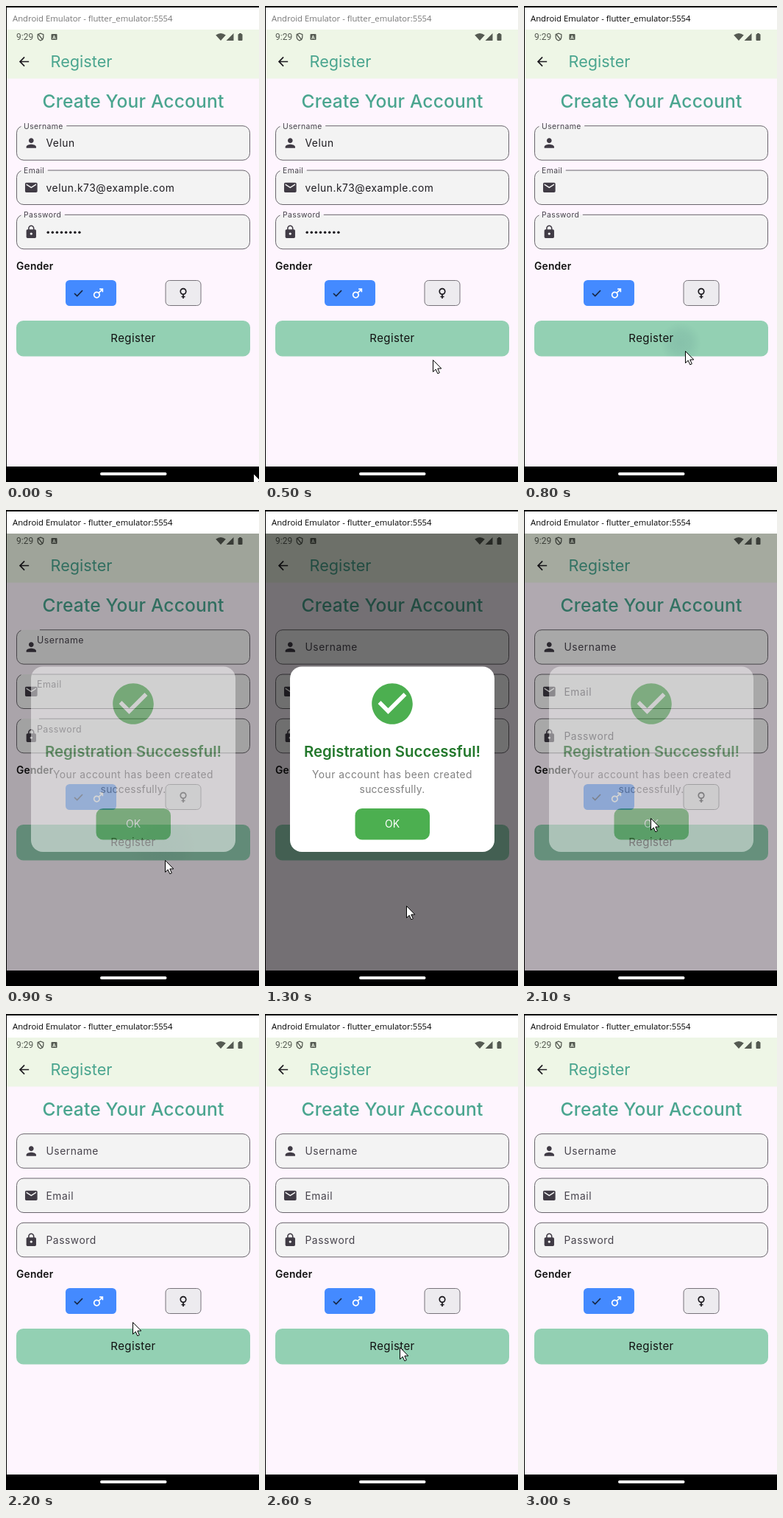
These frames come from a looping animation (344 px wide and 646 px high, 3200 ms). An HTML page with a canvas:

```html
<!DOCTYPE html>
<html lang="en">
<head>
<meta charset="utf-8">
<title>Register form</title>
<style>
  html, body { margin: 0; width: 100%; height: 100%; overflow: hidden; background: #000; }
  canvas { display: block; }
</style>
</head>
<body>
<canvas id="stage" width="344" height="646"></canvas>
<script>
const W = 344, H = 646, LOOP = 3200, STEP = 100;
const ctx = document.getElementById('stage').getContext('2d');
const layer = document.createElement('canvas');
layer.width = W;
layer.height = H;
const layerCtx = layer.getContext('2d');

const SANS = 'Inter, sans-serif';
const INK = '#1d1b20', MUTED = '#47434c', TEAL = '#4aa58f', GREEN = '#4caf50';

const icon = d => new Path2D(d);
const ICONS = {
  back: icon('M20 11H7.83l5.59-5.59L12 4l-8 8 8 8 1.41-1.41L7.83 13H20v-2z'),
  person: icon('M12 12c2.21 0 4-1.79 4-4s-1.79-4-4-4-4 1.79-4 4 1.79 4 4 4zm0 2c-2.67 0-8 1.34-8 4v2h16v-2c0-2.66-5.33-4-8-4z'),
  mail: icon('M20 4H4c-1.1 0-2 .9-2 2v12c0 1.1.9 2 2 2h16c1.1 0 2-.9 2-2V6c0-1.1-.9-2-2-2zm0 4l-8 5-8-5V6l8 5 8-5v2z'),
  lock: icon('M18 8h-1V6c0-2.76-2.24-5-5-5S7 3.24 7 6v2H6c-1.1 0-2 .9-2 2v10c0 1.1.9 2 2 2h12c1.1 0 2-.9 2-2V10c0-1.1-.9-2-2-2zm-6 9c-1.1 0-2-.9-2-2s.9-2 2-2 2 .9 2 2-.9 2-2 2zm3.1-9H8.9V6c0-1.71 1.39-3.1 3.1-3.1 1.71 0 3.1 1.39 3.1 3.1v2z'),
  male: icon('M9.5 11c1.93 0 3.5 1.57 3.5 3.5S11.43 18 9.5 18 6 16.43 6 14.5 7.57 11 9.5 11zm0-2C6.46 9 4 11.46 4 14.5S6.46 20 9.5 20s5.5-2.46 5.5-5.5c0-1.16-.36-2.23-.97-3.12L18 7.42V10h2V4h-6v2h2.58l-3.97 3.97C11.73 9.36 10.66 9 9.5 9z'),
  female: icon('M17.5 9.5C17.5 6.46 15.04 4 12 4S6.5 6.46 6.5 9.5c0 2.7 1.94 4.93 4.5 5.4V17H9v2h2v2h2v-2h2v-2h-2v-2.1c2.56-.47 4.5-2.7 4.5-5.4zm-9 0C8.5 7.57 10.07 6 12 6s3.5 1.57 3.5 3.5S13.93 13 12 13s-3.5-1.57-3.5-3.5z'),
  success: icon('M12 2C6.48 2 2 6.48 2 12s4.48 10 10 10 10-4.48 10-10S17.52 2 12 2zm-2 15l-5-5 1.41-1.41L10 14.17l7.59-7.59L19 8l-9 9z'),
  shield: icon('M12 2L4 5v6.1c0 5 3.4 9.7 8 10.9 4.6-1.2 8-5.9 8-10.9V5z')
};

const FIELDS = [
  { label: 'Username', icon: 'person', value: 'Velun' },
  { label: 'Email', icon: 'mail', value: 'velun.k73@example.com' },
  { label: 'Password', icon: 'lock', dots: 8 }
];

// Pointer tip: [time, x, y]
const POINTER = [
  [0, 336, 634], [600, 219, 468], [800, 219, 468], [1300, 192, 537],
  [1500, 192, 537], [1900, 172, 418], [2500, 172, 418],
  [2800, 206, 520], [2900, 220, 590], [3000, 232, 665]
];

const clamp = v => Math.max(0, Math.min(1, v));
const lerp = (a, b, p) => a + (b - a) * p;
const smooth = p => p * p * (3 - 2 * p);

function pointerAt(t) {
  const i = POINTER.findIndex(k => k[0] > t);
  if (i < 0) return POINTER[POINTER.length - 1].slice(1);
  const [t0, x0, y0] = POINTER[i - 1], [t1, x1, y1] = POINTER[i];
  const p = t < 2500 ? smooth((t - t0) / (t1 - t0)) : (t - t0) / (t1 - t0);
  return [lerp(x0, x1, p), lerp(y0, y1, p)];
}

function text(c, str, x, y, size, color, o = {}) {
  c.font = `${o.weight || 400} ${size}px ${o.family || SANS}`;
  c.letterSpacing = (o.spacing || 0) + 'px';
  c.textAlign = o.align || 'left';
  c.fillStyle = color;
  c.fillText(str, x, y);
}

function rect(c, x, y, w, h, color) {
  c.fillStyle = color;
  c.fillRect(x, y, w, h);
}

function box(c, x, y, w, h, r, fill, stroke) {
  c.beginPath();
  c.roundRect(x, y, w, h, r);
  if (fill) { c.fillStyle = fill; c.fill(); }
  if (stroke) { c.strokeStyle = stroke; c.lineWidth = 1; c.stroke(); }
}

function trace(c, points) {
  c.beginPath();
  points.forEach(([x, y]) => c.lineTo(x, y));
}

function strokeLine(c, points, color, width) {
  trace(c, points);
  c.strokeStyle = color;
  c.lineWidth = width;
  c.stroke();
}

function drawIcon(c, name, cx, cy, size, color, stroke) {
  const s = size / 24;
  c.save();
  c.translate(cx - size / 2, cy - size / 2);
  c.scale(s, s);
  if (stroke) {
    c.strokeStyle = color;
    c.lineWidth = stroke / s;
    c.stroke(ICONS[name]);
  } else {
    c.fillStyle = color;
    c.fill(ICONS[name], 'evenodd');
  }
  c.restore();
}

function drawStatusBar(c) {
  const color = '#555a52';
  text(c, '9:29', 14, 46, 12, color, { family: 'Roboto, sans-serif' });
  drawIcon(c, 'shield', 47, 42, 11.5, color, 1.3);
  strokeLine(c, [[43.5, 38], [50, 46]], color, 1.2);
  box(c, 61.5, 38, 8, 8, 1, color);
  text(c, 'A', 65.5, 44.5, 6.5, '#edf6e5', { weight: 700, align: 'center' });
  c.beginPath();
  c.moveTo(292, 47);
  c.lineTo(285.2, 39.5);
  c.quadraticCurveTo(292, 34.5, 298.8, 39.5);
  c.fillStyle = color;
  c.fill();
  trace(c, [[299.5, 47], [309.5, 47], [309.5, 37]]);
  c.fill();
  box(c, 315.5, 38, 6, 9, 1, color);
  rect(c, 317, 37, 3, 1.5, color);
}

function drawField(c, f, y, float, filled) {
  const x = 14.5, w = 317, h = 46.5;
  box(c, x, y, w, h, 9.5, '#f3f3f3');

  const size = lerp(13.8, 10.4, float), spacing = lerp(.55, .4, float);
  c.save();
  if (float > 0) {
    c.font = `400 10.4px ${SANS}`;
    c.letterSpacing = '0.4px';
    const gap = (c.measureText(f.label).width + 8) * float;
    c.beginPath();
    c.rect(0, 0, W, H);
    c.rect(20.5, y - 3, gap, 6);
    c.clip('evenodd');
  }
  box(c, x, y, w, h, 9.5, null, '#69656c');
  c.restore();

  drawIcon(c, f.icon, 34.3, y + 23.3, 20, '#403b45');
  text(c, f.label, lerp(54.5, 24, float), y + lerp(28.5, 4, float), size, MUTED, { spacing });
  if (!filled) return;
  if (f.value) text(c, f.value, 54.5, y + 28.5, 13.8, INK, { spacing: .55 });
  c.fillStyle = INK;
  for (let i = 0; i < (f.dots || 0); i++) {
    c.beginPath();
    c.arc(57.2 + i * 6.1, y + 24, 1.75, 0, 7);
    c.fill();
  }
}

function drawRipple(c, t) {
  if (t < 700 || t >= 1000) return;
  const p = (t - 700) / 300, r = lerp(12, 60, p);
  const g = c.createRadialGradient(213, 457, 0, 213, 457, r);
  g.addColorStop(0, `rgba(90,140,140,${.32 * (1 - p)})`);
  g.addColorStop(.5, `rgba(90,140,140,${.24 * (1 - p)})`);
  g.addColorStop(1, 'rgba(90,140,140,0)');
  box(c, 14, 427, 318, 48.5, 9.5, g);
}

function drawForm(c, t) {
  rect(c, 1, 32, 343, 593, '#fef5fe');
  rect(c, 1, 32, 343, 66.5, '#eef6e6');
  drawStatusBar(c);
  drawIcon(c, 'back', 24.5, 75.5, 20, INK);
  text(c, 'Register', 60.5, 83, 21.7, TEAL);
  text(c, 'Create Your Account', 173, 138, 24.6, TEAL, { weight: 500, spacing: .15, align: 'center' });

  const float = 1 - clamp((t - 800) / 170);
  FIELDS.forEach((f, i) => drawField(c, f, 162.7 + i * 60.3, float, t < 800));

  text(c, 'Gender', 14, 357.5, 13.8, '#111', { weight: 600, spacing: .2 });
  box(c, 81, 372, 69, 35, 5.5, '#448aff');
  strokeLine(c, [[93, 390], [96.7, 393.6], [104, 386]], '#172440', 1.6);
  drawIcon(c, 'male', 125.5, 390, 20, '#fff');
  box(c, 217, 372.5, 48, 34, 5.5, '#edebef', '#77737a');
  drawIcon(c, 'female', 241, 389.5, 20, INK);

  box(c, 14, 427, 318, 48.5, 9.5, '#93d0b3');
  drawRipple(c, t);
  text(c, 'Register', 173, 456, 15, '#111', { spacing: .4, align: 'center' });
}

function drawDialog(c) {
  const mid = { align: 'center' };
  box(c, 34, 212.5, 278, 251.5, 16, '#fff');
  drawIcon(c, 'success', 173, 263, 66.7, GREEN);
  text(c, 'Registration Successful!', 173, 335, 20.4, '#23782c', { ...mid, weight: 600 });
  text(c, 'Your account has been created', 173, 364, 13.8, '#808080', { ...mid, spacing: .5 });
  text(c, 'successfully.', 173, 384, 13.8, '#808080', { ...mid, spacing: .3 });
  box(c, 122.5, 405, 101.5, 42.5, 9.5, GREEN);
  text(c, 'OK', 173, 431, 14, '#fff', mid);
}

function drawPointer(c, x, y) {
  c.save();
  c.translate(x + .5, y + .5);
  trace(c, [[0, 0], [0, 16], [3.7, 12.6], [6.3, 18.3], [8.8, 17.2], [6.3, 11.5], [11.3, 11.5]]);
  c.closePath();
  c.fillStyle = '#fff';
  c.fill();
  c.strokeStyle = '#000';
  c.lineWidth = 1;
  c.stroke();
  c.restore();
}

function draw(t) {
  rect(ctx, 0, 0, W, H, '#000');
  rect(ctx, 1, 2, 343, 30, '#fff');
  text(ctx, 'Android Emulator - flutter_emulator:5554', 9, 21, 11.3, t < 700 ? '#777' : '#000',
    { family: '"Open Sans", sans-serif' });
  drawForm(ctx, t);

  // The backdrop eases out a little behind the dialog.
  const open = t < 2100 ? clamp((t - 800) / 200) : clamp((2190 - t) / 200);
  if (open > 0) {
    rect(ctx, 1, 32, 343, 593, `rgba(0,0,0,${.54 * Math.pow(open, .7)})`);
    layerCtx.clearRect(0, 0, W, H);
    drawDialog(layerCtx);
    ctx.globalAlpha = open;
    ctx.drawImage(layer, 0, 0);
    ctx.globalAlpha = 1;
  }

  box(ctx, 128, 633, 90.5, 4, 2, '#fff');
  drawPointer(ctx, ...pointerAt(t).map(Math.round));
}

function tick() {
  const t = performance.now() % LOOP;
  draw(Math.floor(t / STEP) * STEP);
  requestAnimationFrame(tick);
}
tick();
</script>
</body>
</html>
```
